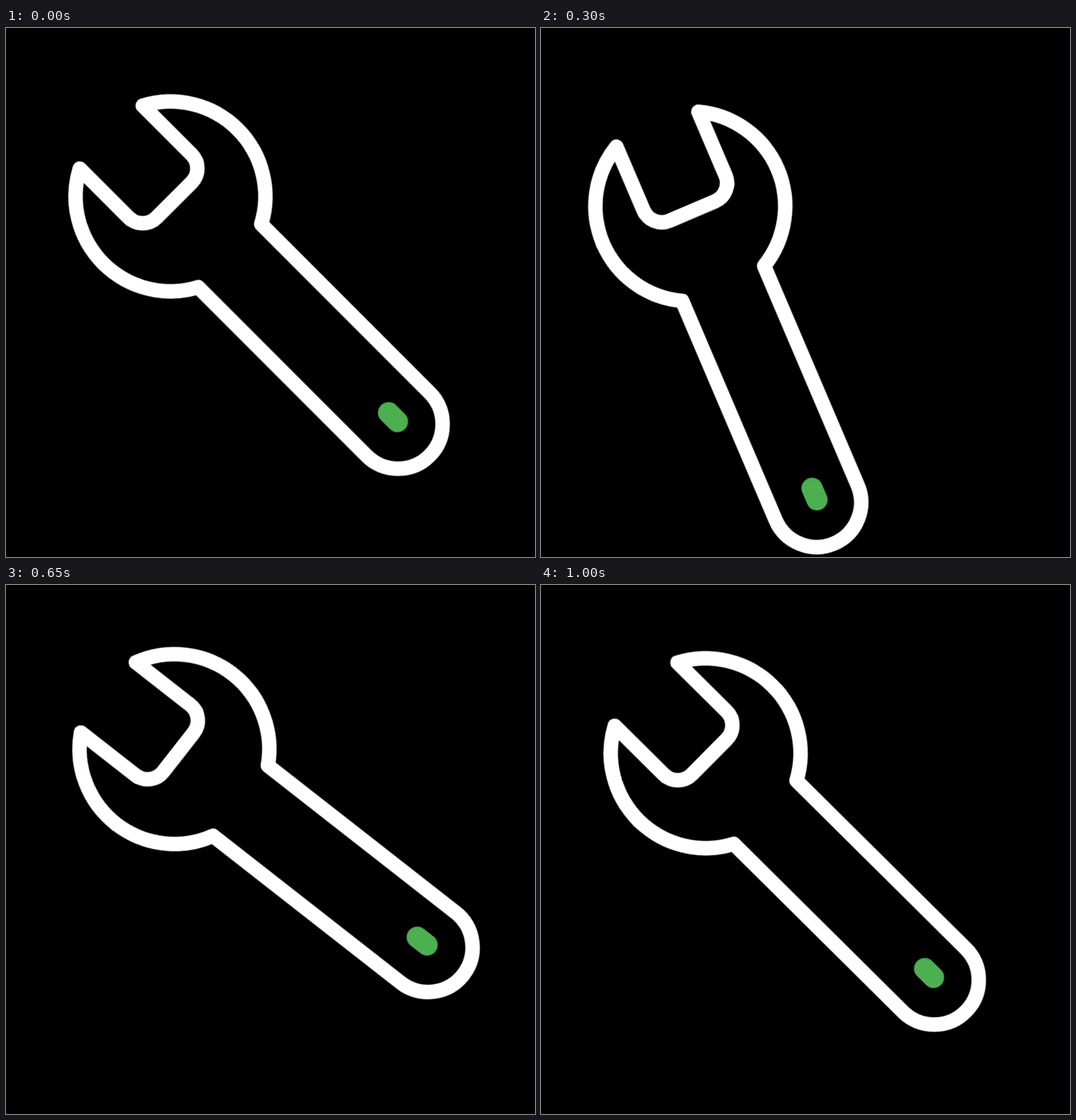
Recreate the animation shown at these times as an HTML page without scripts. Size 748 by 748 pixels, loop 1020 ms.

```html
<!DOCTYPE html>
<html lang="en">
<head>
<meta charset="utf-8">
<title>Wrench</title>
<style>
  html, body {
    margin: 0;
    width: 100%;
    height: 100%;
    overflow: hidden;
    background: #000;
  }
  svg {
    display: block;
    width: 100%;
    height: 100%;
  }
  .swing {
    transform-origin: 185.5px 189.5px;
    animation: swing 1020ms infinite;
  }
  .body {
    fill: none;
    stroke: #fff;
    stroke-width: 20.6;
    stroke-linejoin: round;
  }
  .hole {
    stroke: #4caf50;
    stroke-width: 30;
    stroke-linecap: round;
  }
  @keyframes swing {
    0% {
      transform: rotate(0deg);
      animation-timing-function: cubic-bezier(.325, .1, .25, 1);
    }
    28.19% {
      transform: rotate(22.25deg);
      animation-timing-function: cubic-bezier(.26, .1, .145, 1);
    }
    88.24% {
      transform: rotate(-10deg);
      animation-timing-function: cubic-bezier(.25, .1, .4, 1);
    }
    100% {
      transform: rotate(0deg);
    }
  }
</style>
</head>
<body>
<svg viewBox="0 0 748 748">
  <g class="swing">
    <!-- head centre at the origin, handle along +x -->
    <g transform="translate(232.6 238.1) rotate(45)">
      <path class="body" d="M-118.5-63A134.2 134.2 0 0 1 118.5-63H455.3A63 63 0 0 1 455.3 63H118.5A134.2 134.2 0 0 1-118.5 63H-20.8A28 28 0 0 0 7.2 35V-35A28 28 0 0 0-20.8-63Z"/>
      <path class="hole" d="M434.3-1.9H452"/>
    </g>
  </g>
</svg>
</body>
</html>
```
